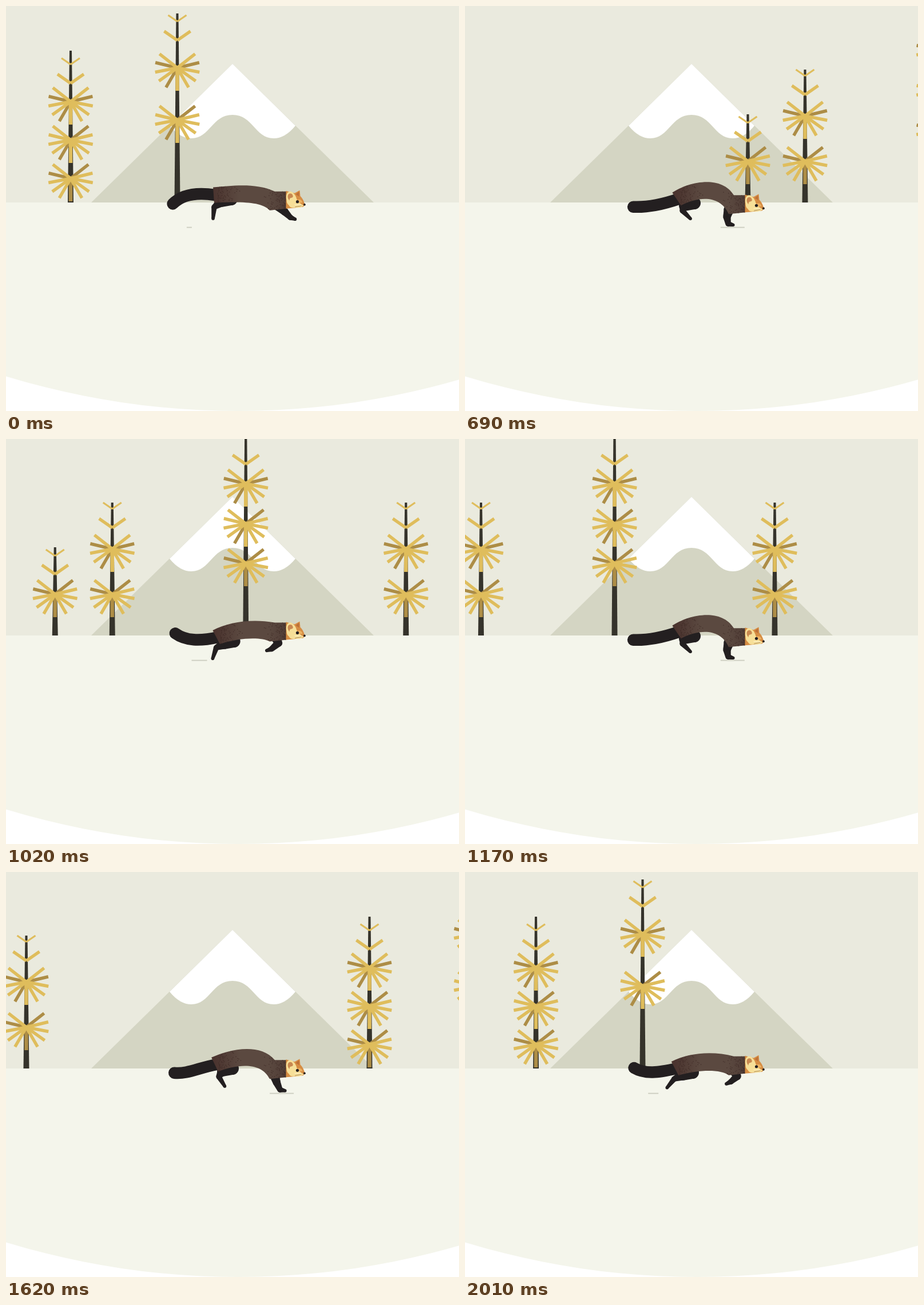
An HTML page with a canvas for the animation above (2.04 s loop, 792 px wide and 707 px high).

```html
<!DOCTYPE html>
<html lang="en">
<head>
<meta charset="utf-8">
<title>Running marten</title>
<style>
html, body { margin: 0; width: 100%; height: 100%; overflow: hidden; background: #fff; }
canvas { display: block; width: 792px; height: 707px; }
</style>
</head>
<body>
<canvas id="stage" width="792" height="707"></canvas>
<script>
const ctx = document.getElementById('stage').getContext('2d');
const LOOP = 2040, TRACK = 2268, HORIZON = 343, STRIDE = 16;
const GOLD = '#dfbd5c', BRONZE = '#ad8d46', BARK = '#35332b', FUR = '#231f20';

// Scenery travel: [ms, px]
const TRAVEL = [[0, 0], [240, 208], [690, 673], [870, 924], [1170, 1239.5], [1620, 1745.5], [2010, 2257], [LOOP, TRACK]];

// Key poses by stride phase.
// rump: x, y, tilt; curl: tail tip angle; hind: ankle x, y, foot angle; front: elbow x, wrist x, y, paw angle
const reach = { rump: [363, 330, .07], curl: [-.8], hind: [364, 351, 1.67], front: [487, 497, 369, .36] };
const POSES = [
  [4, reach],
  [6, { rump: [365, 336, .45], curl: [.09], hind: [372, 357, 1.02], front: [473, 479, 380, .2] }],
  [7, { rump: [370, 337, .6], curl: [.04], hind: [380, 357, .79], front: [458, 460, 380, .25] }],
  [8, { rump: [383, 341, .85], curl: [.8], hind: [415, 366, -.23], front: [449, 450, 380, .28] }],
  [13, { rump: [371, 361, .5], curl: [1.06], hind: [376, 380, .05], front: [479, 461, 369, 3.4] }],
  [19, { rump: [367, 343, .48], curl: [.53], hind: [366, 361, 2.26], front: [476, 465, 366, 2.7] }],
  [20, reach]
];

const TREES = [
  { x: 113, top: 78, twigs: [102, 135], tufts: [167, 234, 301] },
  { x: 299.5, top: 13, twigs: [27, 60], tufts: [108, 199] },
  { x: 1167.5, top: 189, twigs: [204, 236], tufts: [271] },
  { x: 1267.5, top: 111, twigs: [122, 155], tufts: [192, 271] },
  { x: 1501, top: -15, twigs: [-3, 44], tufts: [78, 148, 217] },
  { x: 1781, top: 111, twigs: [122, 155], tufts: [192, 271] }
];

const mixAll = (a, b, k) => a.map((v, i) => v + (b[i] - v) * k);
const wave = (p, peak) => Math.cos(2 * Math.PI * (p - peak) / STRIDE);
const pulse = (p, peak) => Math.cos(Math.PI * (p - peak) / STRIDE) ** 4;

function span(table, at) {
  let i = 0;
  while (i < table.length - 2 && at >= table[i + 1][0]) i++;
  const a = table[i], b = table[i + 1];
  return [a, b, (at - a[0]) / (b[0] - a[0])];
}

function poseAt(phase) {
  const [a, b, k] = span(POSES, phase), out = {};
  for (const part in a[1]) out[part] = mixAll(a[1][part], b[1][part], k);
  return out;
}

function fill(path, color) {
  ctx.fillStyle = color;
  ctx.fill(new Path2D(path));
}
function line(x1, y1, x2, y2, w, color) {
  ctx.strokeStyle = color;
  ctx.lineWidth = w;
  ctx.beginPath();
  ctx.moveTo(x1, y1);
  ctx.lineTo(x2, y2);
  ctx.stroke();
}
function dot(x, y, r, color) {
  ctx.fillStyle = color;
  ctx.beginPath();
  ctx.arc(x, y, r, 0, 7);
  ctx.fill();
}

function drawLand() {
  ctx.fillStyle = '#eaeade';
  ctx.fillRect(0, 0, 792, HORIZON);
  fill('M396 101L643 343H149Z', '#d4d5c3');
  fill('M396 101L286 209Q304 231 324 231C357 231 360 190 396 190C432 190 435 231 468 231Q488 231 506 209Z', '#fff');
  ctx.fillStyle = '#fff';
  ctx.fillRect(0, HORIZON, 792, 364);
  ctx.save();
  ctx.beginPath();
  ctx.rect(0, HORIZON, 792, 364);
  ctx.clip();
  dot(406, 707 - 1390, 1390, '#f4f5eb');
  ctx.restore();
}

// Five needles fan down each side; a bar runs down the trunk
function drawTuft(x, y, bronze) {
  const needles = [[0, 40, 6.5]];
  for (const side of [-1, 1])
    for (let i = 0; i < 5; i++) {
      const angle = (-38 + 24.5 * i) * Math.PI / 180;
      needles.push([side * 39.5 * Math.cos(angle), 39.5 * Math.sin(angle), 5.5]);
    }
  for (const color of [BRONZE, GOLD])
    needles.forEach(([dx, dy, w], i) => {
      if (bronze.includes(i) === (color === BRONZE)) line(x, y, x + dx, y + dy, w, color);
    });
}

function drawTree({ top, twigs, tufts }, x) {
  fill(`M${x - 2} ${top}h4L${x + 5} ${HORIZON}h-10Z`, BARK);
  twigs.forEach((y, i) => {
    for (const side of [-1, 1])
      line(x, y, x + side * (16 + 7 * i), y - 11 - 5 * i, 3.2 + 2 * i, GOLD);
  });
  tufts.forEach((y, i) => {
    const lowest = i === tufts.length - 1 && y > 215;
    drawTuft(x, y, lowest ? [0, 2, 6] : i ? [5, 6] : [2, 5, 7]);
  });
}

// Chain of tapered segments: [x, y, radius]
function drawLeg(joints) {
  joints.forEach(([x, y, r], i) => {
    dot(x, y, r, FUR);
    if (!i) return;
    const [px, py, pr] = joints[i - 1];
    const len = Math.hypot(x - px, y - py) || 1;
    const nx = (py - y) / len, ny = (x - px) / len;
    fill(`M${px + nx * pr} ${py + ny * pr}L${x + nx * r} ${y + ny * r}L${x - nx * r} ${y - ny * r}L${px - nx * pr} ${py - ny * pr}Z`, FUR);
  });
}

function drawTail([x, y, tilt], curl, tipY) {
  const tipX = 294 + 3 * curl, lean = tilt - .24;
  ctx.strokeStyle = FUR;
  ctx.lineWidth = 20.5;
  ctx.lineCap = 'round';
  ctx.beginPath();
  ctx.moveTo(tipX, tipY);
  ctx.bezierCurveTo(tipX + 23 * Math.cos(curl), tipY + 23 * Math.sin(curl),
    x - 30 * Math.cos(lean), y + 30 * Math.sin(lean), x + 3, y);
  ctx.stroke();
  ctx.lineCap = 'butt';
}

// The back rises square to the rump, humps, then drops to a level neck
function drawBody([x, y, tilt], hump, neck) {
  const s = Math.sin(tilt), c = Math.cos(tilt), belly = 349.5 - hump / 2;
  const topX = x - 13.5 * s, topY = y - 13.5 * c;
  const shape = new Path2D(`M${topX} ${topY}
    C${topX + 32 * c} ${topY - 32 * s} ${425 + .6 * hump} ${neck - hump} 470 ${neck}
    H490V${neck + 30}L461 ${neck + 33}
    C447 ${belly} 411 ${belly} ${x + 13.5 * s} ${y + 13.5 * c}Z`);
  const coat = ctx.createLinearGradient(x, y, 490, y);
  coat.addColorStop(0, '#4b342f');
  coat.addColorStop(.35, '#5b4940');
  coat.addColorStop(.75, '#5b4940');
  coat.addColorStop(1, '#503d36');
  ctx.save();
  ctx.fillStyle = coat;
  ctx.fill(shape);
  ctx.clip(shape);
  let seed = 11;
  const rand = () => (seed = seed * 16807 % 2147483647) / 2147483647;
  ctx.fillStyle = '#432f2a';
  for (let i = 0; i < 260; i++) {
    const away = 42 * rand() * rand(), drop = 48 * rand();
    if (i % 2) ctx.fillRect(490 - away, neck - 6 + drop, 1.3, 1.3);
    else ctx.fillRect(x + 6 + away, y - 28 + drop, 1.3, 1.3);
  }
  ctx.restore();
}

function drawHead(x, y) {
  ctx.save();
  ctx.translate(x, y);
  fill('M-32 -25L-17 -21L-8 -26L-7 -16Q-2 -11 0 -4L2 -1L-2 3Q-10 4 -20 5L-32 6Z', '#d68d43');
  fill('M-15 -19L-9 -24L-9 -15Z', '#bd7038');
  fill('M-31 -9C-34 -20 -27 -28 -20 -22Q-15 -18 -13 -10L-8 -4L-1 1Q-8 6 -16 4Q-24 6 -27 0Q-31 -3 -31 -9Z', '#f6df98');
  fill('M-28 -11C-31 -18 -26 -23 -21 -19Q-18 -14 -22 -13Q-26 -13 -26 -8Z', '#c88850');
  fill('M-12 -9Q-6 -12 -3 -5L-7 -4Z', '#edb363');
  line(-17, -1, -5, 0, .8, '#fff8dc');
  line(-16, 3, -5, 1, .7, '#8d653b');
  dot(-12, -6, 2.6, FUR);
  dot(.4, -1, 1.9, FUR);
  ctx.restore();
}

// Slides back under the front paw, then under the hind paw, and shrinks away
function drawShadow(phase) {
  const p = phase < 5 ? phase + STRIDE : phase;
  const x = 382 - (p - 13) * (p < 13 ? 14.3 : 8.8);
  const w = Math.min(42, 42 * (p - 5), 9 * (21 - p));
  ctx.fillStyle = '#cbccbf';
  ctx.fillRect(x - w / 2, 385.6, w, 1.8);
}

function drawMarten(phase) {
  const { rump, curl, hind, front } = poseAt(phase);
  const neck = 326 + 6 * wave(phase, 9);
  const hump = 6 + 32 * pulse(phase, 7.7);
  const hipX = rump[0] + 31, hipY = rump[1] + 7;
  const [ankleX, ankleY, foot] = hind;
  const [elbowX, wristX, wristY, paw] = front;
  const chestY = neck + 25;

  drawShadow(phase);
  drawTail(rump, curl[0], 337 + 14 * pulse(phase, 6.5));
  drawLeg([
    [hipX, hipY, 11], [hipX - 18, hipY + 5, 9], [ankleX, ankleY, 4.8],
    [ankleX + 20 * Math.cos(foot), ankleY + 20 * Math.sin(foot), 2.8]
  ]);
  drawLeg([
    [(465 + elbowX) / 2, chestY, 9], [elbowX, (chestY + wristY) / 2, 6.8], [wristX, wristY, 4.8],
    [wristX + 9 * Math.cos(paw), wristY + 9 * Math.sin(paw), 2.8]
  ]);
  drawBody(rump, hump, neck);
  drawHead(521.5, neck + 24);
}

// Uneven cadence: slow opening, one held beat
function beat(t) {
  if (t >= 540 && t < 600) return 540;
  const step = t < 300 ? 60 : 30;
  return Math.floor(t / step) * step;
}

function draw(t) {
  const ticks = t < 240 ? 4 + t / 60 : t / 30;
  const [, shift] = mixAll(...span(TRAVEL, t));
  drawLand();
  for (const tree of TREES) {
    const x = (tree.x - shift + 100 + TRACK) % TRACK - 100;
    if (x < 850) drawTree(tree, x);
  }
  drawMarten((ticks + 12) % STRIDE + 4);
}

const start = performance.now();
function tick() {
  draw(beat((performance.now() - start) % LOOP));
  requestAnimationFrame(tick);
}
tick();
</script>
</body>
</html>
```
